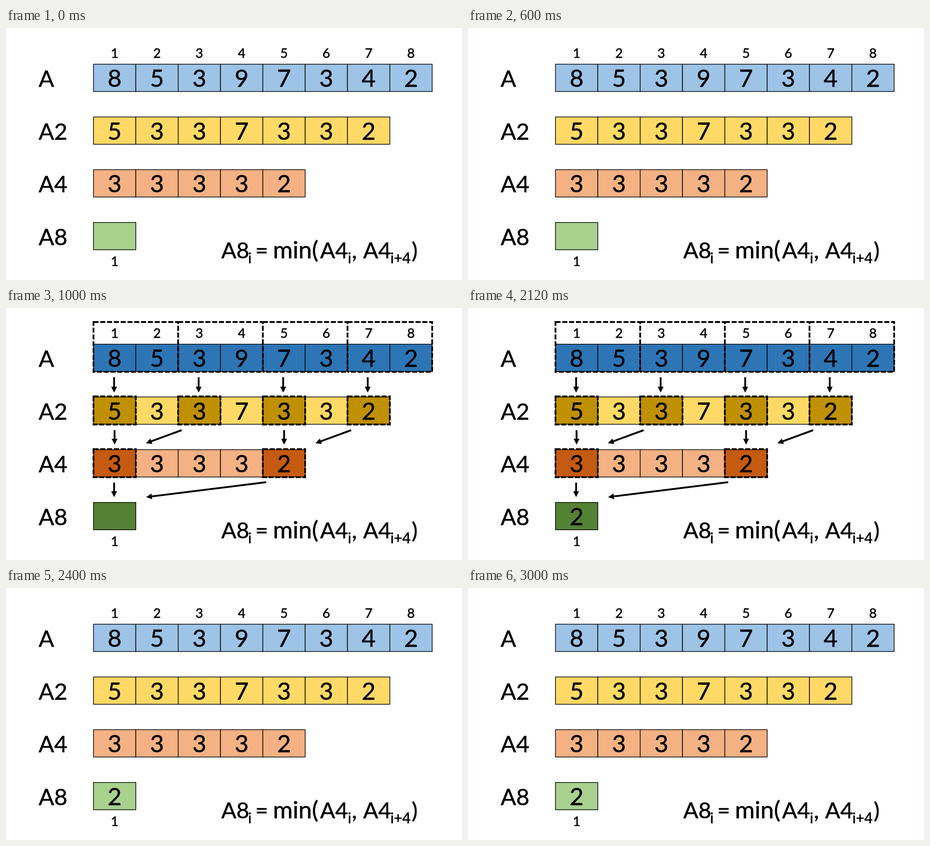
An HTML page for the animation above (3400 ms loop, 1006x557 px).

```html
<!DOCTYPE html>
<html lang="en">
<meta charset="utf-8">
<title>Sparse table minimum</title>
<style>
  html, body { margin: 0; width: 100%; height: 100%; overflow: hidden; background: #fff; }
  svg { display: block; width: 1006px; height: 557px; font-family: Carlito, Lato, sans-serif; }
  text { stroke: #000; stroke-width: .6; }
  .dash { fill: none; stroke: #000; stroke-width: 3.8; stroke-dasharray: 11.2 3.8; }
  .arrow { stroke: #000; stroke-width: 4; marker-end: url(#head); }
</style>
<svg viewBox="0 0 1006 557">
  <marker id="head" viewBox="0 0 12 12" refX="1" refY="6" markerWidth="13" markerHeight="13" markerUnits="userSpaceOnUse" orient="auto">
    <path d="M0 0 12 6 0 12z"/>
  </marker>
</svg>
<script>
const LEFT = 193, CELL = 93.4, TOP = 80, PITCH = 116.6, HEIGHT = 60.4;
const rows = [
  { name: 'A', values: '85397342', light: '#9dc3e6', dark: '#2e75b6', step: 1 },
  { name: 'A2', values: '5337332', light: '#ffd966', dark: '#bf9000', step: 2 },
  { name: 'A4', values: '33332', light: '#f4b183', dark: '#c55a11', step: 4 },
  { name: 'A8', values: '2', light: '#a9d18e', dark: '#548235', step: 8 }
];
const svg = document.querySelector('svg');

function add(tag, attrs, parent = svg) {
  const node = document.createElementNS('http://www.w3.org/2000/svg', tag);
  for (const key in attrs) node.setAttribute(key, attrs[key]);
  return parent.appendChild(node);
}
function text(content, x, y, size, anchor = 'start') {
  const node = add('text', { x, y, 'font-size': size, 'text-anchor': anchor });
  node.textContent = content;
  return node;
}

const active = [];
let result;
rows.forEach((row, r) => {
  const y = TOP + r * PITCH;
  text(row.name, 72, y + 50, 50.5);
  [...row.values].forEach((value, i) => {
    const x = LEFT + i * CELL;
    const rect = add('rect', { x, y, width: CELL, height: HEIGHT, stroke: '#000', 'stroke-width': 1.5 });
    const lit = i % row.step === 0;
    active.push(on => rect.setAttribute('fill', on && lit ? row.dark : row.light));
    result = text(value, x + CELL / 2, y + 50, 53, 'middle');
  });
});
for (let i = 0; i < 8; i++) text(i + 1, LEFT + (i + .5) * CELL, 66, 29, 'middle');
text(1, LEFT + CELL / 2, 525.5, 29, 'middle');

const FORMULA = [
  ['A8', 475, 49], ['=', 550, 49], ['min(', 589, 53], ['A4', 693, 49], [',', 763, 49], ['A4', 788, 49], [')', 895, 49]
];
for (const [part, x, size] of FORMULA) text(part, x, 508.5, size);
for (const [part, x] of [['i', 534], ['i', 754], ['i+4', 848]]) text(part, x, 519.5, 32);

const overlay = add('g', {});
// Adjoining boxes share an edge, so only the first one draws its left side.
function box(column, span, y, height, close = 'z') {
  const width = span * CELL;
  add('path', { class: 'dash', d: `M${LEFT + column * CELL} ${y}h${width}v${height}h${-width}${close}` }, overlay);
}
function arrow(x1, y1, x2, y2) {
  const keep = 1 - 12 / Math.hypot(x2 - x1, y2 - y1);
  add('line', { class: 'arrow', x1, y1, x2: x1 + (x2 - x1) * keep, y2: y1 + (y2 - y1) * keep }, overlay);
}

for (const i of [0, 2, 4, 6]) {
  box(i, 2, 31, 110, i ? '' : 'z');
  box(i, 1, 195.5, 62);
  const x = 238.5 + i * 93.25;
  arrow(x, 153, x, 187);
}
for (const i of [0, 4]) {
  box(i, 1, 312, 62);
  const x = 239.5 + i * 93.5;
  arrow(x, 270, x, 302);
  arrow(x + 148, 270, x + 69, 299);
}
arrow(238.5, 386, 238.5, 418);
arrow(574, 385, 309, 418);

function draw(now) {
  const t = now % 3400;
  const on = t >= 1000 && t < 2400;
  active.forEach(paint => paint(on));
  overlay.setAttribute('visibility', on ? 'visible' : 'hidden');
  result.setAttribute('visibility', t >= 1700 ? 'visible' : 'hidden');
  requestAnimationFrame(draw);
}
draw(performance.now());
</script>
</html>
```
